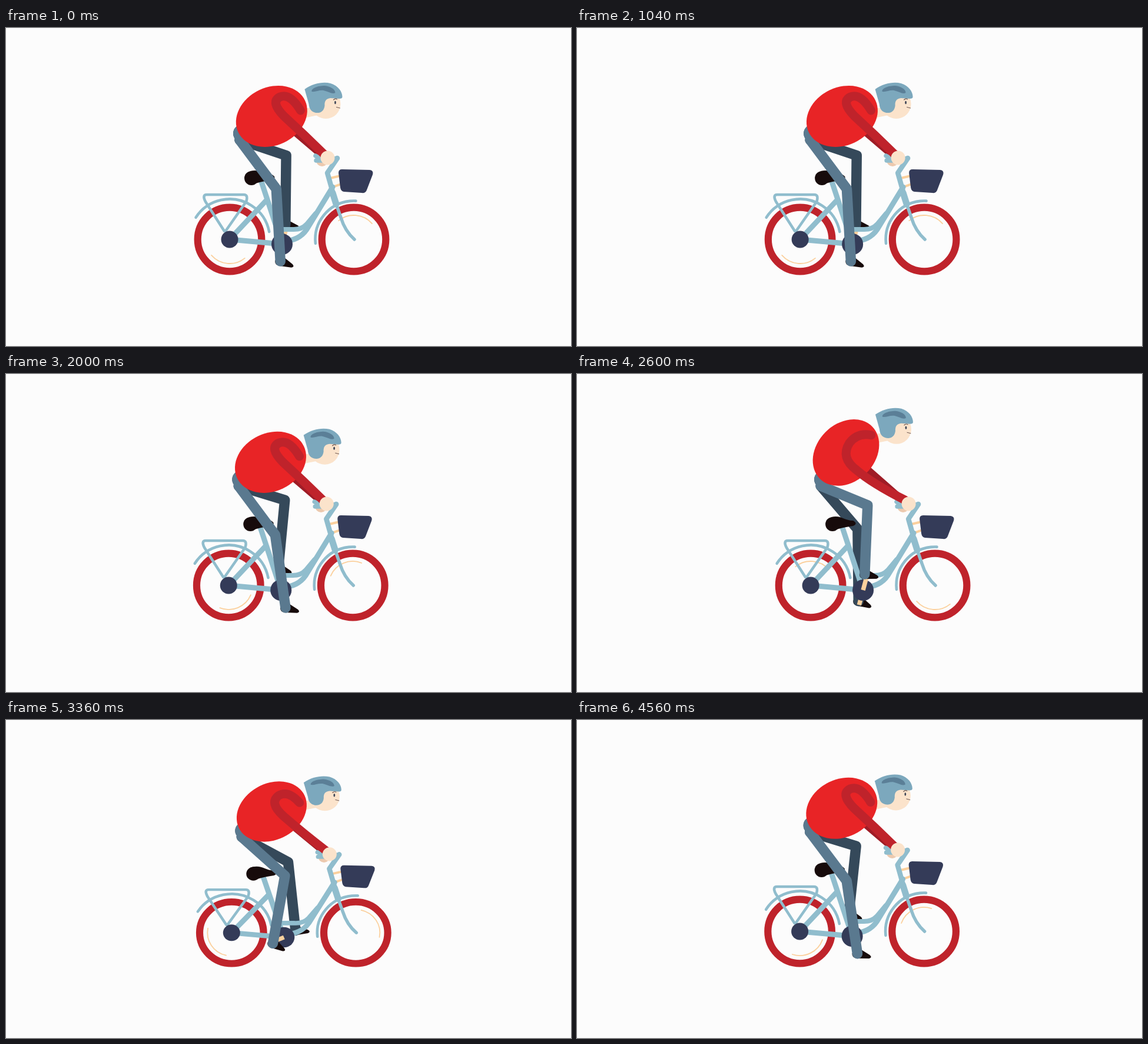
An HTML page with a canvas for the animation above (4.6 s loop, 960 by 540 pixels).

```html
<!DOCTYPE html>
<html lang="en">
<head>
<meta charset="utf-8">
<title>Cyclist</title>
<style>
html, body { margin: 0; height: 100%; overflow: hidden; background: #fcfcfc; }
canvas { display: block; }
</style>
</head>
<body>
<canvas id="stage" width="960" height="540"></canvas>
<script>
const ctx = document.getElementById('stage').getContext('2d');
const TAU = Math.PI * 2, RAD = Math.PI / 180;
const LOOP = 4600, STEP = 40, GROUND = 420;
const FRAME = '#90bdcd', NAVY = '#343b58', RED = '#e82426', SLEEVE = '#bf232b', FAR_SLEEVE = '#9f1c26';
const TROUSER = '#5a798f', FAR_TROUSER = '#35495a', SKIN = '#fbe3cb', FAR_SKIN = '#ecc9ae';
const PEACH = '#fbd09d', BLACK = '#170b0b', HELMET = '#7ca8bd';
const CRANK = [467, 367], REAR = [378, 359], FRONT = [589, 359];

// Cosine of a phase counted in turns
const wave = turns => Math.cos(turns * TAU);

function fill(path, color) {
  ctx.fillStyle = color;
  ctx.fill(new Path2D(path));
}
function line(path, width, color = FRAME, cap = 'round') {
  ctx.lineWidth = width;
  ctx.strokeStyle = color;
  ctx.lineCap = cap;
  ctx.lineJoin = 'round';
  ctx.stroke(new Path2D(path));
}
function oval(x, y, rx, ry, color, turn = 0) {
  ctx.fillStyle = color;
  ctx.beginPath();
  ctx.ellipse(x, y, rx, ry, turn, 0, TAU);
  ctx.fill();
}
const disc = ([x, y], r, color) => oval(x, y, r, r, color);
function arc([x, y], r, from, to, width, color) {
  ctx.lineWidth = width;
  ctx.strokeStyle = color;
  ctx.lineCap = 'round';
  ctx.beginPath();
  ctx.arc(x, y, r, from * RAD, to * RAD);
  ctx.stroke();
}

// The foot circles the crank; the knee swings with a small second harmonic
function leg(phase, color, dx, dy) {
  const ankle = [CRANK[0] + dx + 22 * wave(phase + .27), CRANK[1] + dy + 1 + 29.5 * wave(phase + .05)];
  const swing = phase + .04;
  const knee = [469.5 + dx - 9 * wave(swing) - 4 * wave(2 * swing), 248 + dy + 26 * wave(swing)];
  ctx.save();
  ctx.translate(...ankle);
  ctx.rotate((4 + 14 * wave(phase - .2)) * RAD);
  fill('M-9 0C-9 5-6 8 0 8L20 8Q26 6 21 2L6-7-6-6Z', BLACK);
  ctx.restore();
  disc([399, 179], 15, color);
  line(`M395 190L${knee}L${ankle}`, 17.5, color);
}

function crankArm(phase) {
  const a = phase * TAU + 105 * RAD, [x, y] = CRANK;
  line(`M${x} ${y}L${x + 26 * Math.cos(a)} ${y + 26 * Math.sin(a)}`, 7.5, PEACH, 'butt');
}

function wheel(hub, glint) {
  arc(hub, 54.3, 0, 360, 12.2, SLEEVE);
  arc(hub, 41, glint - 44, glint + 44, 1.8, PEACH);
}

function bike(phase) {
  wheel(REAR, phase * 360 + 95);
  wheel(FRONT, phase * 360 - 85);
  arc(REAR, 68.5, 213, 349, 4.6, FRAME);
  arc(FRONT, 65.5, 174, 273, 4.6, FRAME);
  line('M369 345L337 295Q331 283 339 283L402 283Q410 283 406 295L371 345', 4.6);
  line('M549 255L566 251M553 270L567 265', 4, PEACH);
  fill('M569 240L616 241Q623 242 621 249L611 275Q609 281 603 280L572 278Q567 277 566 271L563 246Q563 240 569 240Z', NAVY);

  line(`M${REAR}L${CRANK}M${REAR}L441 292M431 258L${CRANK}`, 9);
  line('M467 363C488 361 500 355 509 342L553 270', 9);
  line('M462 342L484 342Q500 343 509 333L524 315', 8);
  line('M561 221L544 246L557 292', 8.5);
  line('M553 280L559 299', 11);
  line('M558 296L567 322Q574 345 590 359', 5.5);
  line('M524 217L536 223M525 225L541 225L561 221', 7.5);
  disc(REAR, 14.5, NAVY);

  disc([415, 255], 12, BLACK);
  fill('M413 243C430 239 434 249 450 249Q459 254 450 258Q437 260 429 262Q422 264 417 265Z', BLACK);
}

function head(rise) {
  ctx.save();
  ctx.translate(-17 * rise, -34 * rise);
  line('M500 145L530 139', 15, SKIN);
  disc([541, 128], 25, SKIN);
  fill('M505 103C519 93 536 90 549 93C562 97 569 107 569 116Q569 119 564 119L549 118Q538 119 539 131C538 140 532 144 524 143Q513 141 512 128Z', HELMET);
  fill('M517 107C516 101 528 97 539 97C549 98 557 103 557 109C552 112 546 107 537 105C530 104 523 108 517 107Z', '#5b7f97');
  oval(557, 125.5, 1.4, 2.8, '#3c4456');
  line('M554 121Q557 118 560 120', 1.2, '#6b5550');
  line('M559 133.5L565 135', 1, '#6b5550');
  ctx.restore();
}

// Each point glides from its crouched place to its upright one
function arm(rise) {
  const at = (x1, y1, x2, y2) => [x1 + (x2 - x1) * rise, y1 + (y2 - y1) * rise];
  const shoulder = at(498, 139, 481, 104), top = at(463, 117, 444, 117), bend = at(470, 150, 456, 163);
  line(`M${shoulder}Q${at(480, 110, 458, 99)} ${top}Q${at(446, 126, 428, 142)} ${bend}`
    + `Q${at(505, 182, 483, 186)} 538 214`, 15, SLEEVE);
}

function draw(t) {
  // Pedalling eases off for the last stretch
  const slow = 3092;
  const phase = Math.min(t, slow) / 1040 + Math.max(t - slow, 0) / 1560;
  const rise = .49 - .53 * wave(phase + .035);
  // The bike surges forward, more on every other turn, and sinks under each push
  const surge = phase + .07, bounce = Math.sin((phase + .04) * TAU);
  const reach = Math.floor(surge) % 2 ? 10 : 19.5;
  const x = .5 * t / LOOP + reach * ((1 - wave(surge)) / 2) ** .75;
  const squash = (.036 + .018 * bounce) * bounce ** 4;

  ctx.setTransform(1, 0, 0, 1, 0, 0);
  ctx.fillStyle = '#fcfcfc';
  ctx.fillRect(0, 0, 960, 540);
  ctx.setTransform(1, 0, 0, 1 - squash, x, GROUND * squash);

  leg(phase + .53, FAR_TROUSER, -1, -8);
  crankArm(phase + .5);
  line(`M${470 - 2 * rise} ${160 - 3 * rise}L531 212`, 13, FAR_SLEEVE);
  disc([535, 225], 10, FAR_SKIN);
  bike(phase);
  disc(CRANK, 18, NAVY);
  crankArm(phase);
  leg(phase, TROUSER, 0, 0);
  head(rise);
  oval(449 - 11 * rise, 149.5 - 16 * rise, 62.8, 49.2, RED, -(26 + 19 * rise) * RAD);
  arm(rise);
  disc([544.5, 220.5], 12, SKIN);
}

function tick() {
  const t = performance.now() % LOOP;
  draw(Math.floor(t / STEP) * STEP);
  requestAnimationFrame(tick);
}
tick();
</script>
</body>
</html>
```
